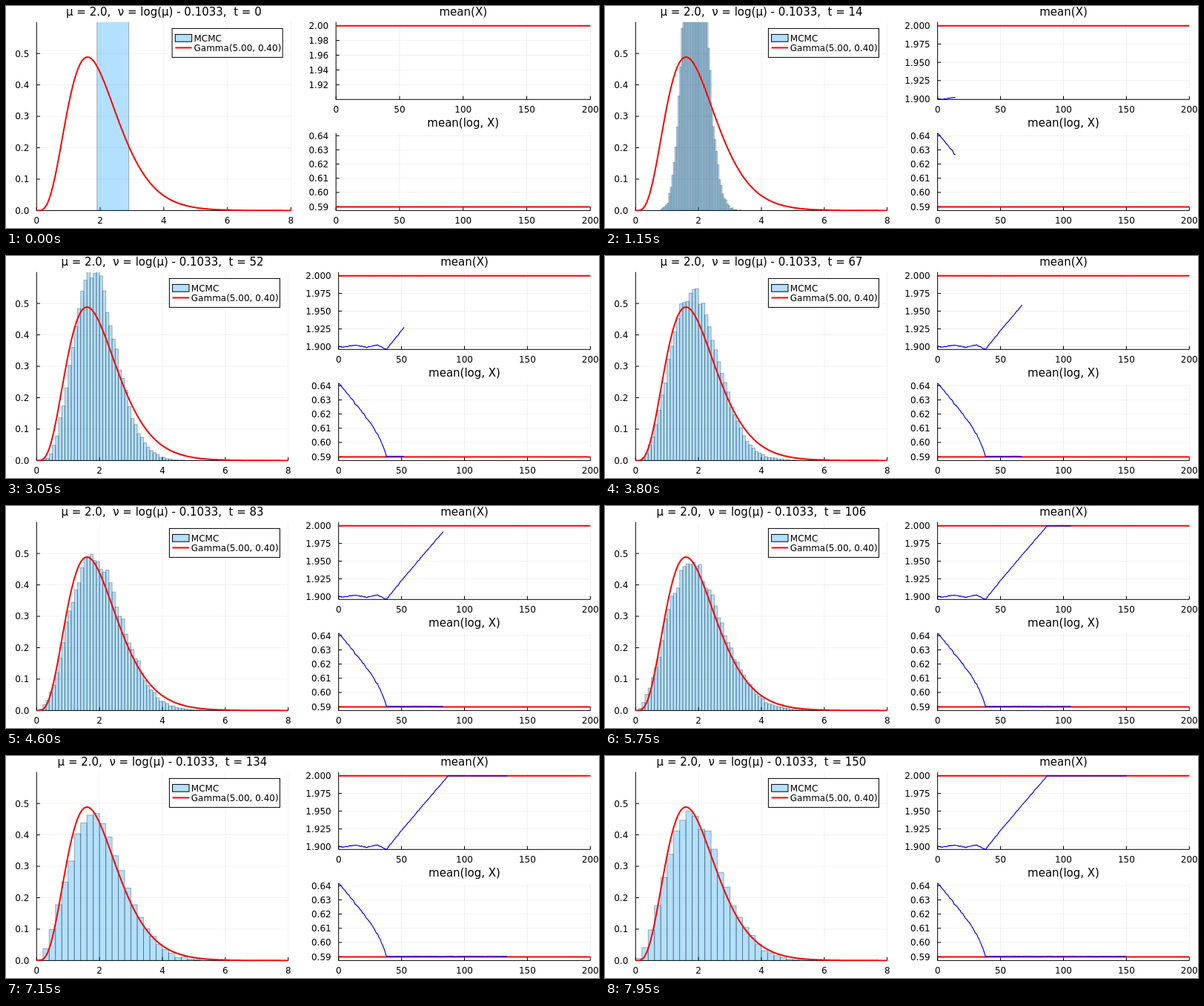
Write an HTML page with a canvas that moves like this. It is 800 px wide and 300 px high and loops after 8 s.

```html
<!DOCTYPE html>
<html lang="en">
<head>
<meta charset="utf-8">
<title>Sampling towards a gamma distribution</title>
<style>
  html, body { margin: 0; width: 100%; height: 100%; overflow: hidden; background: #fff; }
  canvas { display: block; width: 100%; height: 100%; }
</style>
</head>
<body>
<canvas id="stage" width="800" height="300"></canvas>
<script>
const ctx = document.getElementById('stage').getContext('2d');
const FONT = '"DejaVu Sans", Verdana, sans-serif';
const LOOP = 8000, HOLD = 500, STEP = 50;
const MU = 2, NU = Math.log(2) - 0.1033, FIRST = 1.9;
const SAMPLES = 10000, SETTLED = 38;
const FILL = 'rgba(0,154,250,0.3)';

// Key points of the sample mean: [step, value]
const MEAN = [[0, FIRST], [4, 1.8992], [13, 1.9022], [22, 1.899], [31, 1.9024],
  [SETTLED, 1.896], [52, 1.927], [87, 1.9998], [150, 1.9998]];

const ticks = (from, step, n) => Array.from({ length: n }, (_, i) => from + i * step);

const rand = (a, b) => {
  const s = Math.sin(a * 12.9898 + b * 78.233) * 43758.5453;
  return s - Math.floor(s);
};
// Roughly normal, unit variance
const noise = (a, b) => 2 * (rand(a, b) + rand(a + 300, b) + rand(a, b + 300) - 1.5);

function trend(t) {
  const i = Math.max(1, MEAN.findIndex(k => k[0] >= t));
  const [t0, v0] = MEAN[i - 1], [t1, v1] = MEAN[i];
  return v0 + (v1 - v0) * (t - t0) / (t1 - t0);
}

const meanAt = t => trend(t) + (t > 0 && t < 86 ? 0.0003 : 0) * noise(t, 1);

function logAt(t) {
  const u = Math.min(1, t / SETTLED);
  const wobble = t === 0 ? 0 : u < 1 ? 0.0003 : 0.00006;
  return Math.log(FIRST) - 0.0517 * (0.8 * u + 0.2 * u ** 7) + wobble * noise(t, 2);
}

const gamma = x => x ** 4 * Math.exp(-2.5 * x) / 0.24576;

// The samples spread as x^(2m-1) exp(-m x^2 / power), with 1/m growing to a limit
function spread(t) {
  const s = 0.0129 * t;
  const k = 0.7 * s / (1 + s ** 4) ** 0.25;
  const mean = trend(t);
  const power = mean ** 2 / (1 - k / 4 + k * k / 32);
  return { m: 1 / k, power, sd: Math.sqrt(power - mean ** 2) };
}

function bars(t) {
  if (t === 0) return [[FIRST, 1, 1]];
  const { m, power, sd } = spread(t);
  // Freedman-Diaconis width, rounded to a tidy step
  const w = [0.02, 0.05, 0.1, 0.2].find(step => 0.1284 * sd <= 1.1 * step);
  const shape = ticks(w / 2, w, Math.round(5.6 / w)).map(x => {
    const q = x * x / power;
    return Math.exp((m - 0.5) * Math.log(q) - m * (q - 1));
  });
  const area = w * shape.reduce((a, b) => a + b);
  return shape.map((v, i) => {
    const d = v / area;
    return [i * w, w, d + 0.6 * noise(t, i + 7) * Math.sqrt(d / (SAMPLES * w))];
  }).filter(bar => bar[2] > 0.0008);
}

function text(str, x, y, align, size = 12) {
  ctx.font = `${size}px ${FONT}`;
  ctx.textAlign = align;
  ctx.fillStyle = '#000';
  ctx.fillText(str, x, y);
}

function line(points, color, width) {
  ctx.beginPath();
  points.forEach(([x, y]) => ctx.lineTo(x, y));
  ctx.strokeStyle = color;
  ctx.lineWidth = width;
  ctx.stroke();
}

function box(x, y, w, h, fill, stroke) {
  ctx.fillStyle = fill;
  ctx.strokeStyle = stroke;
  ctx.lineWidth = 1;
  ctx.fillRect(x, y, w, h);
  ctx.strokeRect(x, y, w, h);
}

// Draws grid, axes, tick labels and title; returns the data-to-pixel maps
function panel({ l, r, top, bot, xr, yr, xt, yt, digits, title }) {
  const X = v => l + (v - xr[0]) / (xr[1] - xr[0]) * (r - l);
  const Y = v => bot - (v - yr[0]) / (yr[1] - yr[0]) * (bot - top);
  const grid = 'rgba(0,0,0,0.06)';
  xt.forEach(v => line([[X(v), bot], [X(v), top]], grid, 1));
  yt.forEach(v => line([[l, Y(v)], [r, Y(v)]], grid, 1));
  line([[l, top], [l, bot], [r, bot]], '#000', 1);
  xt.forEach(v => {
    line([[X(v), bot], [X(v), bot - 4.6]], '#000', 1);
    text(String(v), X(v), bot + 17.2, 'center');
  });
  yt.forEach(v => {
    line([[l, Y(v)], [l + 4.6, Y(v)]], '#000', 1);
    text(v.toFixed(digits), l - 10, Y(v) + 4.4, 'right');
  });
  text(title, (l + r) / 2, top - 8.7, 'center', 15);
  return { X, Y };
}

function clipped(l, top, r, bot, draw) {
  ctx.save();
  ctx.beginPath();
  ctx.rect(l - 0.5, top, r - l + 1, bot - top + 1);
  ctx.clip();
  draw();
  ctx.restore();
}

function legend(right) {
  const x = right - 160.3;
  box(x, 30.4, 149.1, 39, '#fff', '#000');
  box(x + 4.2, 38.4, 22.4, 9.8, FILL, '#000');
  line([[x + 4.2, 56.4], [x + 26.6, 56.4]], '#f00', 2);
  text('MCMC', x + 29.4, 47.9, 'left');
  text('Gamma(5.00, 0.40)', x + 29.4, 60.9, 'left');
}

function histogram(t, r) {
  const l = 41.3, top = 21.7, bot = 276.4;
  const { X, Y } = panel({
    l, r, top, bot, xr: [0, 8], yr: [0, 0.6],
    xt: ticks(0, 2, 5), yt: ticks(0, 0.1, 6), digits: 1,
    title: `μ = 2.0,  ν = log(μ) - 0.1033,  t = ${t}`
  });
  clipped(l, top, r, bot, () => {
    for (const [x, w, h] of bars(t))
      box(X(x), Y(h), X(x + w) - X(x), bot - Y(h), FILL, 'rgba(0,0,0,0.3)');
    line(ticks(0, 0.02, 401).map(x => [X(x), Y(gamma(x))]), '#f00', 2);
  });
  legend(r);
}

function trace(t, opts, goal, valueAt) {
  const { l, r, top, bot } = opts;
  const { X, Y } = panel({ ...opts, xr: [0, 200], xt: ticks(0, 50, 5) });
  clipped(l, top, r, bot, () => {
    line([[l, Y(goal)], [r, Y(goal)]], '#f00', 2);
    if (t > 0) line(ticks(0, 1, t + 1).map(k => [X(k), Y(valueAt(k))]), '#00f', 1.2);
  });
}

function draw(t) {
  ctx.fillStyle = '#fff';
  ctx.fillRect(0, 0, 800, 300);
  // Longer tick labels narrow every panel once sampling starts
  const start = t === 0;
  const l = start ? 445.2 : 448.7, r = 788.3;
  histogram(t, start ? 384.4 : 380.7);

  const low = Math.min(...ticks(0, 1, t + 1).map(meanAt));
  trace(t, {
    l, r, top: 21.7, bot: 126.3, yr: [low, MU + 0.05 * (MU - low)],
    yt: start ? ticks(1.92, 0.02, 5) : ticks(1.9, 0.025, 5),
    digits: start ? 2 : 3, title: 'mean(X)'
  }, MU, meanAt);

  const high = Math.log(FIRST);
  trace(t, {
    l, r, top: 171.7, bot: 276.4, yr: [NU - 0.05 * (high - NU), high],
    yt: ticks(0.59, 0.01, 6), digits: 2, title: 'mean(log, X)'
  }, NU, logAt);
}

const begin = performance.now();
let shown = -1;
function tick() {
  const ms = (performance.now() - begin) % LOOP;
  const t = ms < HOLD ? 0 : Math.floor((ms - HOLD) / STEP) + 1;
  if (t !== shown) draw(shown = t);
  requestAnimationFrame(tick);
}
tick();
</script>
</body>
</html>
```
